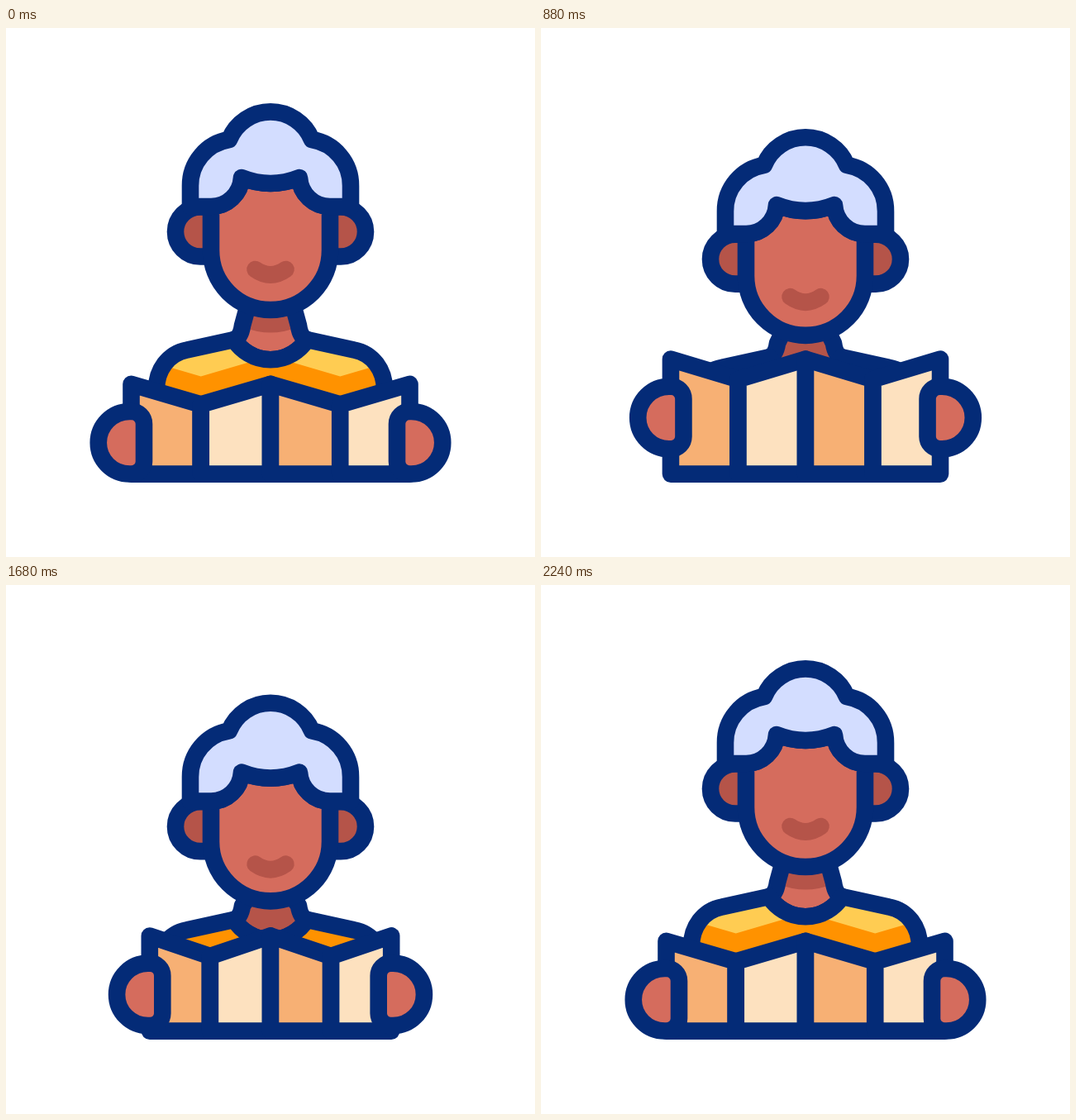
These frames come from a looping animation (640x640 px, 2400 ms). An HTML page with a canvas:

```html
<!DOCTYPE html>
<html lang="en">
<head>
<meta charset="utf-8">
<title>Reader with a map</title>
<style>
  html, body { margin: 0; width: 100%; height: 100%; overflow: hidden; background: #fff; }
  canvas { display: block; }
</style>
</head>
<body>
<canvas id="stage" width="640" height="640"></canvas>
<script>
const ctx = document.getElementById('stage').getContext('2d');
const LOOP = 2400;
const NAVY = '#042b77', SKIN = '#d56c5d', SKIN_DARK = '#b55449', HAIR = '#d3ddff';
const SHIRT = '#ffcc52', SHIRT_DARK = '#ff9200', PAPER = ['#f7b074', '#fde1bf'];

// Bezier easing with end handles at heights 0 and 1
function bezier(x1, x2) {
  return p => {
    let lo = 0, hi = 1, s = 0.5;
    for (let i = 0; i < 24; i++) {
      s = (lo + hi) / 2;
      const x = 3 * x1 * s * (1 - s) ** 2 + 3 * x2 * s * s * (1 - s) + s ** 3;
      if (x < p) lo = s; else hi = s;
    }
    return s * s * (3 - 2 * s);
  };
}
const smooth = bezier(0.33, 0.67), settle = bezier(0.33, 0.1);
const launch = bezier(0.9, 0.67), relax = bezier(0.33, 0.33);

// Weights of the "peek" and "hide" poses; the rest pose has neither
function pose(t, [start, peek, hide, back, end]) {
  const part = (a, b, ease) => ease(Math.min(1, Math.max(0, (t - a) / (b - a))));
  const down = part(peek, hide, settle) - part(hide, back, launch);
  const away = part(start, peek, smooth) - part(back, end, relax);
  return { peek: away - down, hide: down };
}

const blend = (w, peek, hide) => w.peek * peek + w.hide * hide;

// Fill, optional shading clipped to the shape, then outline
function shape(d, dy, fill, shade) {
  const path = new Path2D(d);
  ctx.save();
  ctx.translate(0, dy);
  ctx.fillStyle = fill;
  ctx.fill(path);
  if (shade) {
    ctx.save();
    ctx.clip(path);
    ctx.translate(0, -dy);
    shade();
    ctx.restore();
  }
  ctx.strokeStyle = NAVY;
  ctx.stroke(path);
  ctx.restore();
}

function bothSides(draw) {
  draw();
  ctx.save();
  ctx.translate(640, 0);
  ctx.scale(-1, 1);
  draw();
  ctx.restore();
}

function draw(t) {
  const headPose = pose(t, [200, 450, 1497, 1903, 2240]);
  const mapPose = pose(t, [200, 437, 1400, 1740, 2240]);
  const head = blend(headPose, -26.6, 51.3);
  const face = blend(headPose, -35.3, 57.5);
  const body = blend(headPose, -14, 34);
  const squeeze = blend(mapPose, 26.8, 0);
  const lift = blend(mapPose, 0, -38);

  const left = 151.5 + squeeze, right = 640 - left;
  const fold = (320 - left) / 2;
  const ridge = 430.8 + lift, valley = ridge + 24.7;
  const shadow = new Path2D(`M${left} ${ridge - 34}L${left + fold} ${valley - 34}L320 ${ridge - 34}
    L${right - fold} ${valley - 34}L${right} ${ridge - 34}V560H${left}Z`);
  const castShadow = color => { ctx.fillStyle = color; ctx.fill(shadow); };

  ctx.fillStyle = '#fff';
  ctx.fillRect(0, 0, 640, 640);
  ctx.lineWidth = 20.6;
  ctx.lineJoin = ctx.lineCap = 'round';

  // Neck and shirt
  const nape = 338 + head - body;
  shape(`M292 ${nape}L286 360Q284 374 276 377A52 52 0 0 0 364 377Q356 374 354 360L348 ${nape}`, body, SKIN, () => {
    castShadow(SKIN_DARK);
    ctx.beginPath();
    ctx.arc(320, 286.5 + head, 82, 0, 7);
    ctx.fill();
  });
  shape(`M276 377L219 389.5C196 394 182 414 182 437V500H458V437C458 414 444 394 421 389.5
    L364 377A52 52 0 0 1 276 377Z`, body, SHIRT, () => castShadow(SHIRT_DARK));

  // Head: the features slide a little against the skull
  bothSides(() => shape('M248 216.5H235a30 30 0 0 0 0 60H248', face, SKIN_DARK));
  const d = face - head, hairline = 216 + d, notch = 181 + d;
  shape(`M248 ${hairline}A37 37 0 0 0 285 ${notch}Q320 ${notch + 14} 355 ${notch}A37 37 0 0 0 392 ${hairline}
    V269A72 72 0 0 1 248 269Z`, head, SKIN, () => {
    castShadow(SKIN_DARK);
    ctx.strokeStyle = SKIN_DARK;
    ctx.stroke(new Path2D(`M301.5 ${292 + face}Q320 ${305 + face} 338.5 ${292 + face}`));
  });
  shape(`M223 ${hairline}V191A56 56 0 0 1 270 135A54 54 0 0 1 370 135A56 56 0 0 1 417 191V${hairline}
    H392A37 37 0 0 1 355 ${notch}Q320 ${notch + 14} 285 ${notch}A37 37 0 0 1 248 ${hairline}Z`, head, HAIR);

  // Map panels and hands
  for (let i = 0; i < 4; i++) {
    const x = left + i * fold;
    const [a, b] = i % 2 ? [valley, ridge] : [ridge, valley];
    shape(`M${x} ${a}L${x + fold} ${b}V539.6H${x}Z`, 0, PAPER[i % 2]);
  }
  bothSides(() => shape(`M${left - 2} 464h2.5a15 15 0 0 1 15 15v45.5a15 15 0 0 1 -15 15h-2.5
    a37.75 37.75 0 0 1 0 -75.5Z`, lift, SKIN));
}

function tick() {
  draw(performance.now() % LOOP);
  requestAnimationFrame(tick);
}
tick();
</script>
</body>
</html>
```
